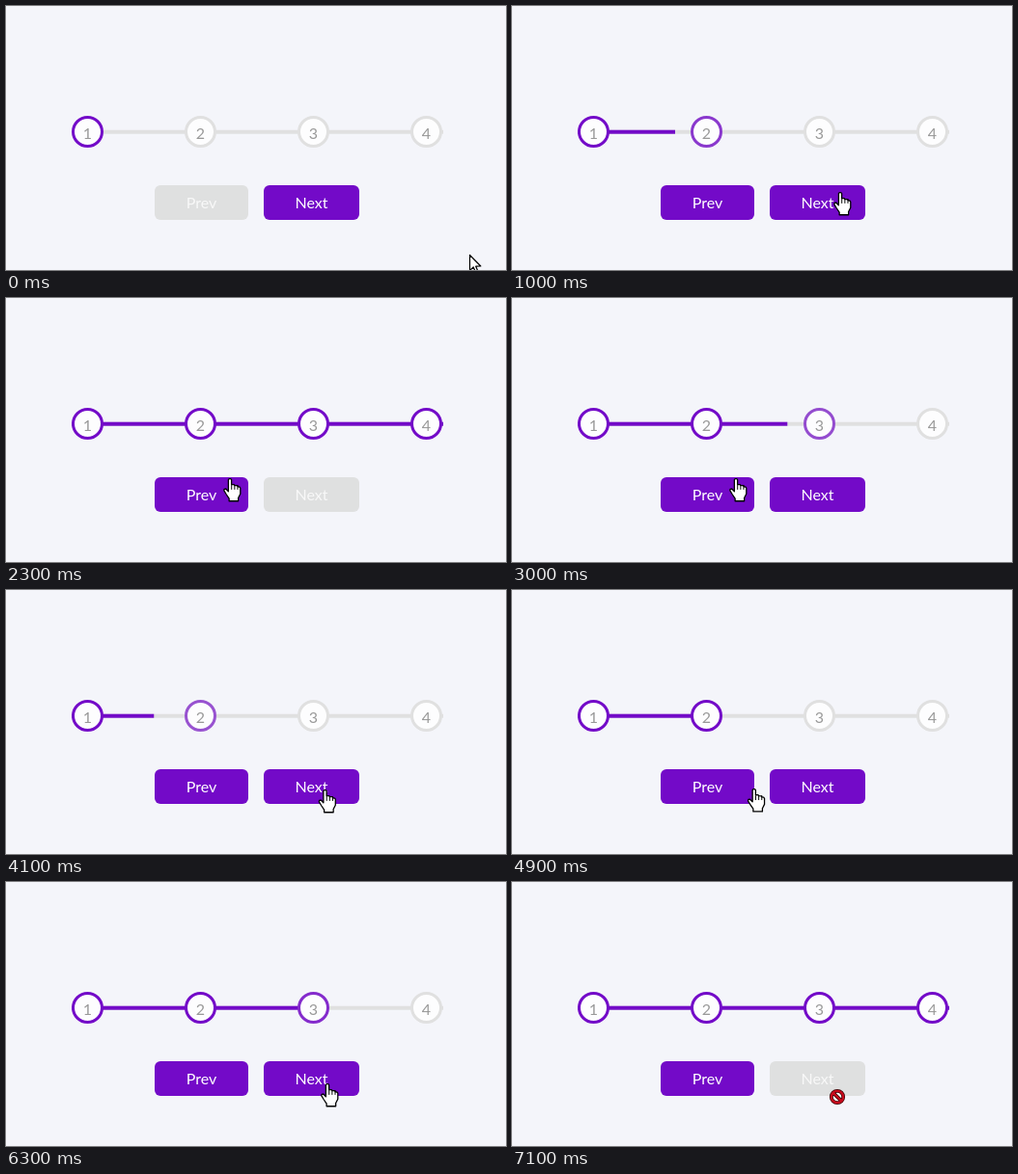
Write an HTML page with a canvas that moves like this. It is 518 px wide and 274 px high and loops after 7.2 s.

```html
<!DOCTYPE html>
<html lang="en">
<head>
<meta charset="utf-8">
<title>Progress steps</title>
<style>
html, body { margin: 0; width: 518px; height: 274px; overflow: hidden; background: #f4f5fa; }
canvas { display: block; }
</style>
</head>
<body>
<canvas id="stage" width="518" height="274"></canvas>
<script>
const ctx = document.getElementById('stage').getContext('2d');
const LOOP = 7200, TICK = 100, FADE = 400, PRESS = 70;
const BG = '#f4f5fa', PURPLE = [115, 10, 200], GREY = [224, 224, 224];
const X0 = 68, X1 = 453, MID = 130.7;
const PREV = { label: 'Prev', x: 154, y: 186, w: 97, h: 36, step: -1 };
const NEXT = { label: 'Next', x: 267, y: 186, w: 99, h: 36, step: 1 };

// [time, direction] of each click
const clicks = [
  [806, 1], [1200, 1], [1580, 1],
  [2390, -1], [2918, -1], [3330, -1],
  [3945, 1], [5440, -1],
  [5740, 1], [6080, 1], [6390, 1]
];

// [time, x, y] of the pointer
const route = [
  [0, 480, 258], [130, 480, 258], [720, 340, 193], [1800, 340, 193],
  [2250, 232, 187], [3420, 232, 187], [3820, 330.5, 207], [4600, 330.5, 207],
  [5000, 236, 206], [5450, 236, 206], [5600, 333, 209], [6900, 333, 209],
  [6980, 337, 223], [7200, 337, 223]
];

const mix = (a, b, k) => a + (b - a) * k;
const rgb = (a, b, k) => `rgb(${a.map((v, i) => Math.round(mix(v, b[i], k)))})`;
const smooth = k => k * k * (3 - 2 * k);

// CSS "ease": cubic-bezier(.25, .1, .25, 1)
function ease(x) {
  if (x <= 0) return 0;
  if (x >= 1) return 1;
  const curve = (s, a, b) => 3 * s * (1 - s) ** 2 * a + 3 * s * s * (1 - s) * b + s ** 3;
  let lo = 0, hi = 1;
  for (let i = 0; i < 24; i++) {
    const m = (lo + hi) / 2;
    if (curve(m, 0.25, 0.25) < x) lo = m; else hi = m;
  }
  return curve(lo, 0.1, 1);
}

function stepAt(t) {
  return clicks.reduce((n, [at, d]) => at <= t ? n + d : n, 0);
}

// Value that follows goal(step), restarting its fade whenever the goal changes
function fade(t, goal) {
  let from = goal(0), to = from, since = -FADE, n = 0;
  for (const [at, d] of clicks) {
    if (at > t) break;
    n += d;
    if (goal(n) === to) continue;
    from = mix(from, to, ease((at - since) / FADE));
    to = goal(n);
    since = at;
  }
  return mix(from, to, ease((t - since) / FADE));
}

function text(str, x, y, color) {
  ctx.font = '16px Lato, "Open Sans", sans-serif';
  ctx.textAlign = 'center';
  ctx.fillStyle = color;
  ctx.fillText(str, x, y);
}

function drawSteps(t) {
  const bar = (w, color) => {
    ctx.fillStyle = rgb(color, color, 0);
    ctx.fillRect(X0, MID - 2, w, 4);
  };
  bar(X1 - X0, GREY);
  bar((X1 - X0) * fade(t, n => n / 3), PURPLE);
  for (let i = 0; i < 4; i++) {
    const x = 84.5 + 117 * i;
    ctx.beginPath();
    ctx.arc(x, 130.5, 15, 0, 7);
    ctx.fillStyle = '#fdfdfe';
    ctx.fill();
    ctx.lineWidth = 3;
    ctx.strokeStyle = rgb(GREY, PURPLE, fade(t, n => n >= i ? 1 : 0));
    ctx.stroke();
    text(i + 1, x, 137.5, '#999');
  }
}

const enabled = (b, n) => b === PREV ? n > 0 : n < 3;

function drawButton(b, t) {
  const on = enabled(b, stepAt(t));
  const down = clicks.some(([at, d]) => d === b.step && t >= at - PRESS && t < at);
  const cx = b.x + b.w / 2, cy = b.y + b.h / 2;
  ctx.save();
  ctx.translate(cx, cy);
  if (down) ctx.scale(0.95, 0.95);
  ctx.beginPath();
  ctx.roundRect(-b.w / 2, -b.h / 2, b.w, b.h, 6);
  ctx.fillStyle = on ? rgb(PURPLE, PURPLE, 0) : '#dfe0e0';
  ctx.fill();
  text(b.label, 0, 6, on ? '#fff' : '#f8f8f8');
  ctx.restore();
}

function shape(points) {
  ctx.beginPath();
  points.forEach(([x, y]) => ctx.lineTo(x, y));
  ctx.closePath();
  ctx.fillStyle = '#fff';
  ctx.strokeStyle = '#000';
  ctx.lineWidth = 1.2;
  ctx.lineJoin = 'round';
  ctx.fill();
  ctx.stroke();
}

const pointers = {
  arrow() {
    shape([[0.5, 0.5], [0.5, 16.5], [4.2, 13], [6.6, 18.5], [9, 17.5], [6.7, 12.2], [11.8, 12]]);
  },
  hand() {
    ctx.scale(1.08, 1.08);
    ctx.translate(-6, 0.5);
    shape([[4.5, 1], [5.3, 0], [6.7, 0], [7.5, 1], [7.5, 5.5], [10, 5.6], [10.6, 6.5],
      [13, 6.6], [13.6, 7.6], [15.3, 7.9], [16, 9], [16, 14.5], [14, 18.5], [14, 21.5],
      [5.2, 21.5], [5.2, 19], [2.5, 15], [0.3, 11.5], [0.5, 10], [2, 9.7], [4.5, 12.2]]);
    ctx.beginPath();
    for (const x of [7.6, 10.5, 13.4]) {
      ctx.moveTo(x, 6);
      ctx.lineTo(x, 10.5);
    }
    ctx.lineWidth = 0.9;
    ctx.stroke();
  },
  no() {
    ctx.beginPath();
    ctx.arc(0, 0, 6.2, 0, 7);
    ctx.fillStyle = '#fff';
    ctx.fill();
    ctx.moveTo(-4.2, -4.2);
    ctx.lineTo(4.2, 4.2);
    ctx.strokeStyle = '#3a0508';
    ctx.lineWidth = 3.8;
    ctx.stroke();
    ctx.strokeStyle = '#c80a1c';
    ctx.lineWidth = 2.3;
    ctx.stroke();
  }
};

function drawPointer(t) {
  let i = 0;
  while (i < route.length - 2 && route[i + 1][0] <= t) i++;
  const [ta, xa, ya] = route[i], [tb, xb, yb] = route[i + 1];
  const k = smooth((t - ta) / (tb - ta));
  const x = mix(xa, xb, k), y = mix(ya, yb, k);
  // the pointer's look is only refreshed while it moves
  const seen = xa === xb && ya === yb ? ta : t;
  const over = [PREV, NEXT].find(b => x >= b.x && x <= b.x + b.w && y >= b.y && y <= b.y + b.h + 2);
  const kind = !over ? 'arrow' : enabled(over, stepAt(seen)) ? 'hand' : 'no';
  ctx.save();
  ctx.translate(x, y);
  pointers[kind]();
  ctx.restore();
}

function draw() {
  const now = performance.now() + 20;
  const t = Math.floor((now % LOOP) / TICK) * TICK;
  ctx.fillStyle = BG;
  ctx.fillRect(0, 0, 518, 274);
  drawSteps(t);
  drawButton(PREV, t);
  drawButton(NEXT, t);
  drawPointer(t);
  requestAnimationFrame(draw);
}
draw();
</script>
</body>
</html>
```
